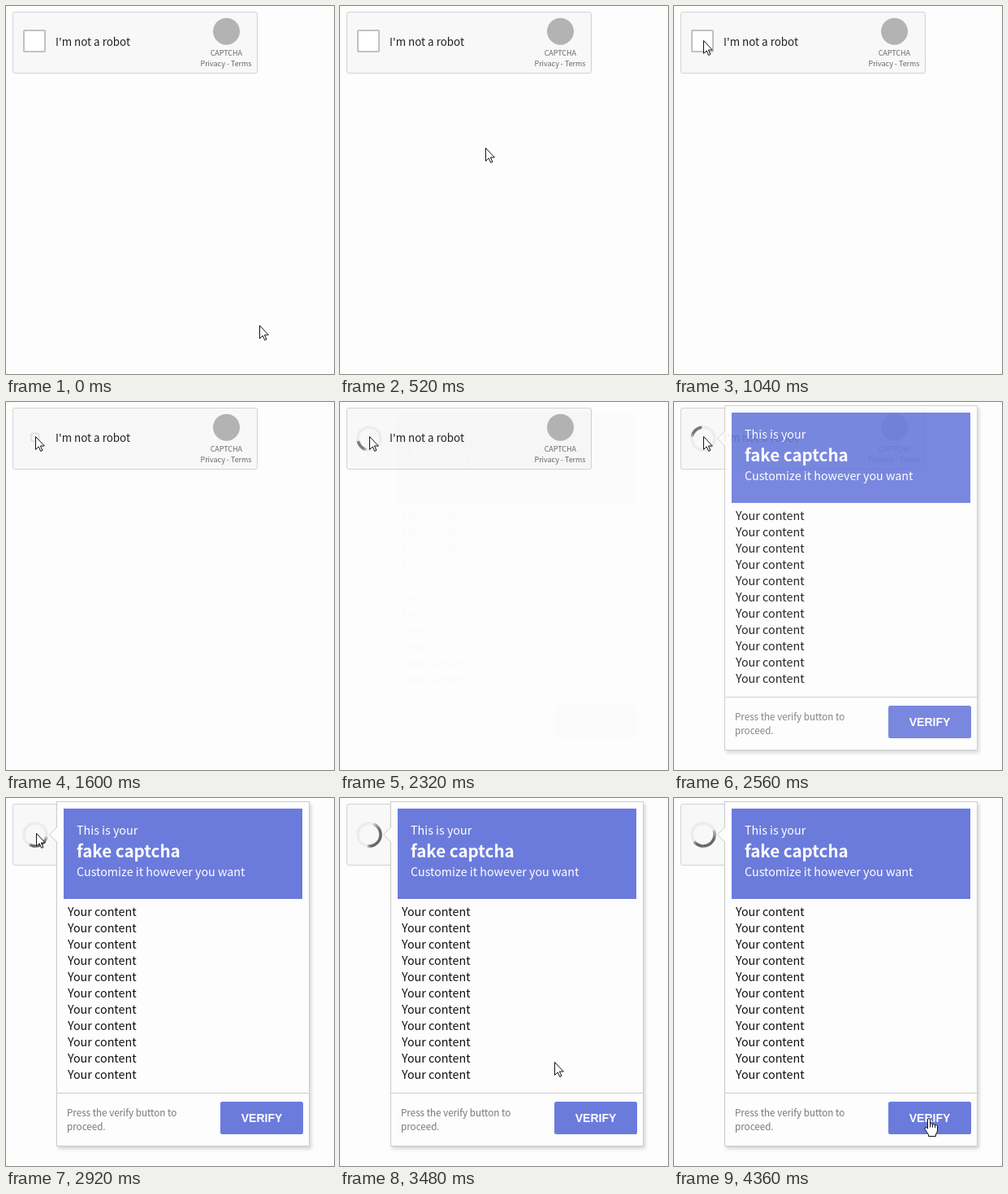
An HTML page for the animation above (4.4 s loop, 404 by 452 pixels).

```html
<!DOCTYPE html>
<html lang="en">
<head>
<meta charset="utf-8">
<title>Robot check</title>
<style>
  html, body { margin: 0; width: 100%; height: 100%; overflow: hidden; background: #fdfdfd; }
  svg { display: block; width: 404px; height: 452px; }
  text { font-family: "Noto Sans CJK SC", "Noto Sans CJK JP", "Noto Sans CJK", sans-serif; font-size: 14.3px; }
  .label { font-size: 13.4px; fill: #222; }
  .small { font-size: 8.95px; fill: #666; text-anchor: middle; }
  .head { fill: #fff; }
  .big { font-size: 20.6px; font-weight: 700; }
  .hint { font-size: 11.63px; fill: #777; }
  .verify { font: bold 14px "Liberation Sans", Arial, sans-serif; fill: #fff; text-anchor: middle; }
  #popup .panel { filter: drop-shadow(2px 3px 2px rgba(0, 0, 0, .16)); }
</style>
</head>
<body>
<svg viewBox="0 0 404 452" xmlns="http://www.w3.org/2000/svg">
  <rect x="8.5" y="7.5" width="301" height="75" rx="2.5" fill="#f8f8f8" stroke="#d2d2d2"/>
  <rect id="box" fill="#fff" stroke="#c1c1c1" stroke-width="2"/>
  <g id="spinner" fill="none" stroke-width="3.6">
    <circle cx="36" cy="45" r="14" stroke="#ececec"/>
    <g id="arc"></g>
  </g>
  <text class="label" x="61" y="49">I'm not a robot</text>
  <circle cx="271.5" cy="31.2" r="16.5" fill="#b3b3b3"/>
  <text class="small" x="271.3" y="61">CAPTCHA</text>
  <text class="small" x="271" y="74">Privacy - Terms</text>

  <g id="popup">
    <rect class="panel" x="62.5" y="4.5" width="311" height="423" fill="#fdfdfd" stroke="#cccccc"/>
    <path d="M63.2 35.5L53.5 45L63.2 54.5" fill="#fdfdfd" stroke="#cccccc"/>
    <rect x="62.9" y="36" width="2" height="18" fill="#fdfdfd"/>
    <rect x="71" y="13" width="294" height="111" fill="#6b7bdc"/>
    <text class="head" x="87" y="45">This is your</text>
    <text class="head big" x="87" y="73">fake captcha</text>
    <text class="head" x="87" y="96">Customize it however you want</text>
    <g id="lines"></g>
    <path d="M63 362.5H373" stroke="#cccccc"/>
    <text class="hint" x="75" y="391">Press the verify button to</text>
    <text class="hint" x="75" y="408">proceed.</text>
    <rect x="264" y="373" width="102" height="40" rx="2.5" fill="#6b7bdc"/>
    <text class="verify" x="315" y="398">VERIFY</text>
  </g>

  <g id="arrow" fill="#fff" stroke="#111" stroke-linejoin="miter">
    <path d="M.5 .5V16.4L4.2 12.9L6.7 18.4L8.9 17.4L6.4 12H11.3Z"/>
  </g>
  <g id="hand" fill="#fff" stroke="#111" stroke-linejoin="round">
    <path d="M-1.5 13V2Q-1.5 .5 0 .5T1.5 2V7.2Q3 5.8 4.4 7.8Q6 6.8 7.2 8.6Q9.5 7.8 10.5 10V15Q10.3 18 8.5 20V22.5H-.5V20.5L-4.6 14.5Q-5.5 12.5-4.4 11.6Q-3 11-1.5 13Z"/>
    <path d="M1.5 7V11.5M4.5 8V11.7M7.5 9V12" fill="none"/>
  </g>
</svg>
<script>
const LOOP = 4400;
const $ = id => document.getElementById(id);
const set = (node, attrs) => { for (const k in attrs) node.setAttribute(k, attrs[k]); return node; };
const add = (parent, tag, attrs) =>
  parent.appendChild(set(document.createElementNS("http://www.w3.org/2000/svg", tag), attrs));
const mix = (a, b, p) => a + (b - a) * p;
const span = (t, from, to) => Math.min(1, Math.max(0, (t - from) / (to - from)));
const swing = p => .5 - Math.cos(Math.PI * p) / 2;
const smoother = p => p * p * p * (p * (p * 6 - 15) + 10);
const easeOut = p => 1 - Math.pow(1 - p, 1.65);
const linear = p => p;

for (let i = 0; i < 11; i++)
  add($("lines"), "text", { x: 76, y: 145 + i * 20, fill: "#111" }).textContent = "Your content";

// The arc is a fan of short strokes, darkest near its leading end.
const SEGMENTS = 24;
const segments = Array.from({ length: SEGMENTS }, (_, i) => {
  const edge = Math.min(1, (i + 3) / 9, (SEGMENTS - i + 1) / 4);
  return add($("arc"), "path", { stroke: "#5c5c5c", "stroke-opacity": edge });
});

// time, x, y, easing into this point
const reach = [
  [2900, 36, 42, linear],
  [3480, 263, 323, p => p * p * (2.2 - 1.2 * p)],
  [3600, 325, 376, p => p * (1.25 - .25 * p)],
  [3760, 337, 389, easeOut],
  [4160, 314, 393, swing]
];

// time, middle angle, sweep in degrees
const turns = [
  [1960, 0, 60], [2440, 182, 65], [2560, 226, 75],
  [3480, 735, 165], [4360, 1140, 165], [4400, 1159, 165]
];

function pick(table, t) {
  let i = 1;
  while (i < table.length - 1 && t > table[i][0]) i++;
  const a = table[i - 1], b = table[i];
  return [a, b, span(t, a[0], b[0])];
}

function pointer(t) {
  if (t < 2900) {
    const u = smoother(span(t, 40, 951));
    const bend = c => 2 * u * (1 - u) * c + u * u;
    return [mix(312, 36, bend(.36)), mix(392, 42, bend(.64))];
  }
  const [a, b, p] = pick(reach, t), e = b[3](p);
  return [mix(a[1], b[1], e), mix(a[2], b[2], e)];
}

function drawBox(t) {
  const p = easeOut(span(t, 1380, 1800));
  const size = mix(26, 3, p);
  set($("box"), {
    x: mix(35, 36, p) - size / 2, y: mix(43, 43.5, p) - size / 2,
    width: size, height: size, rx: mix(1, 3, p), opacity: 1 - Math.pow(p, 1.5)
  });
}

function drawSpinner(t) {
  set($("spinner"), { opacity: span(t, 1960, 2200) });
  const [a, b, p] = pick(turns, t);
  const mid = mix(a[1], b[1], p), sweep = mix(a[2], b[2], p);
  const at = i => {
    const r = (mid + sweep * (i / SEGMENTS - .5)) * Math.PI / 180;
    return `${36 + 14 * Math.cos(r)} ${45 + 14 * Math.sin(r)}`;
  };
  segments.forEach((s, i) => set(s, { d: `M${at(i)}A14 14 0 0 1 ${at(i + 1)}` }));
}

function drawPointer(t) {
  const [x, y] = pointer(t).map(Math.round);
  const over = t > 2900 && x >= 264 && x <= 366 && y >= 373;
  const transform = `translate(${x} ${y})`;
  set($("arrow"), { transform, visibility: over ? "hidden" : "visible" });
  set($("hand"), { transform, visibility: over ? "visible" : "hidden" });
}

function draw(t) {
  drawBox(t);
  drawSpinner(t);
  set($("popup"), { opacity: swing(span(t, 2301, 2627)) });
  drawPointer(t);
}

const start = performance.now();
function tick() {
  draw((performance.now() - start) % LOOP);
  requestAnimationFrame(tick);
}
tick();
</script>
</body>
</html>
```
